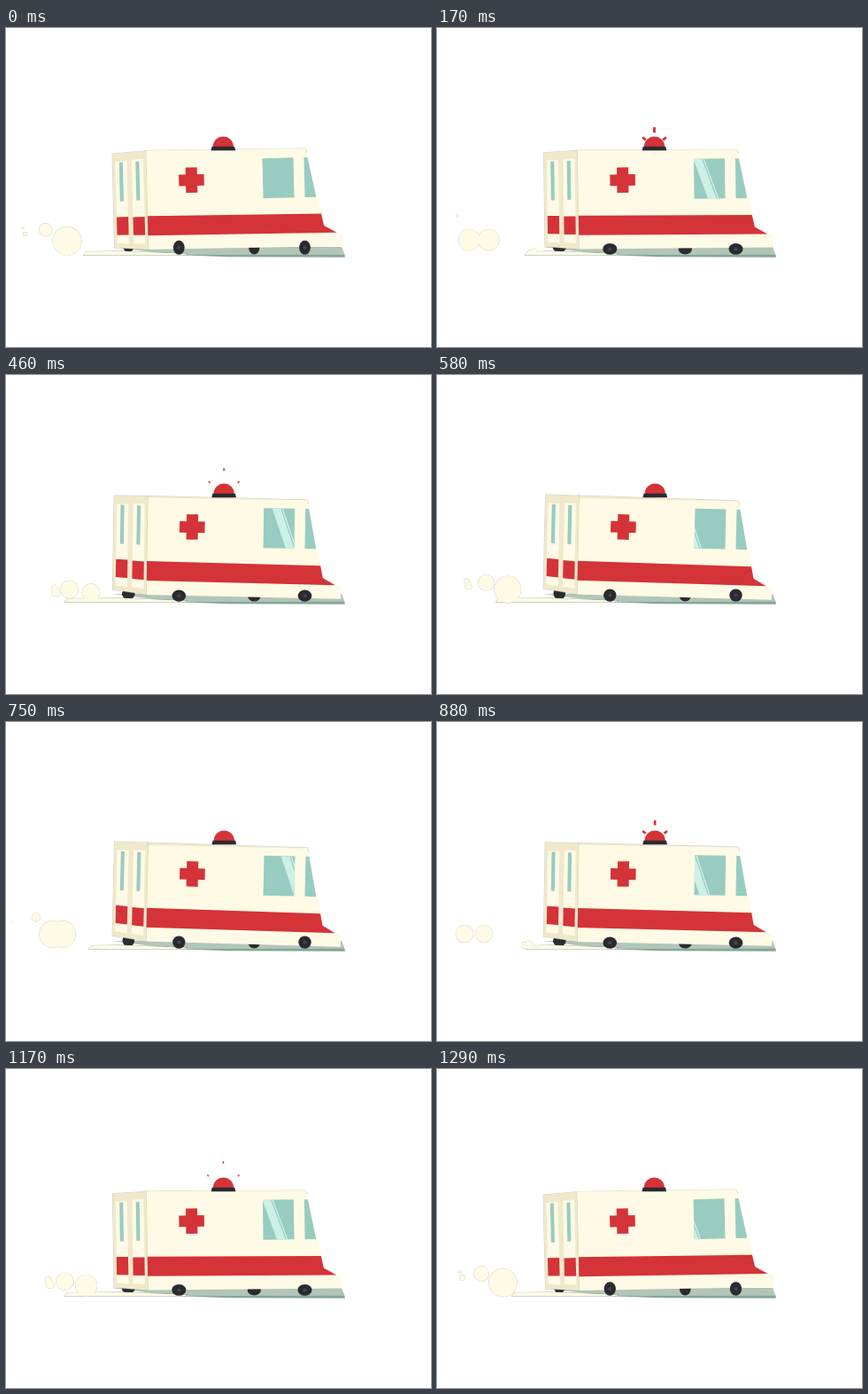
An HTML page with a canvas that plays this animation: 480x360 px, repeating every 1330 ms.

```html
<!DOCTYPE html>
<html lang="en">
<head>
<meta charset="utf-8">
<title>Ambulance</title>
<style>
  html, body { margin: 0; width: 100%; height: 100%; overflow: hidden; background: #fff; }
  canvas { display: block; }
</style>
</head>
<body>
<canvas id="stage" width="480" height="360"></canvas>
<script>
const ctx = document.getElementById('stage').getContext('2d');
const LOOP = 1330, STEPS = 32, CYCLE = 16, TURN = Math.PI * 2;
const CREAM = '#fffae5', BEIGE = '#f0e8cb', RED = '#d43338', TEAL = '#98ccc1',
      GLINT = '#cdf0e6', DARK = '#2b2a30', SHADE = '#b1c5b8', DEEP = '#86a697',
      EDGE = 'rgba(150,165,140,.5)', LINE = 'rgba(120,150,128,.8)';

function poly(color, pts, stroke) {
  ctx.beginPath();
  for (let j = 0; j < pts.length; j += 2) ctx.lineTo(pts[j], pts[j + 1]);
  ctx.closePath();
  if (stroke) {
    ctx.strokeStyle = stroke;
    ctx.lineWidth = 1;
    ctx.stroke();
  }
  ctx.fillStyle = color;
  ctx.fill();
}

function oval(color, x, y, rx, ry = rx) {
  ctx.beginPath();
  ctx.ellipse(x, y, rx, ry, 0, 0, TURN);
  ctx.fillStyle = color;
  ctx.fill();
}

function rect(color, x, y, w, h) {
  ctx.fillStyle = color;
  ctx.fillRect(x, y, w, h);
}

// Apply a transform about a point while drawing.
function about(x, y, b, c, paint) {
  ctx.save();
  ctx.translate(x, y);
  ctx.transform(1, b, c, 1, 0, 0);
  ctx.translate(-x, -y);
  paint();
  ctx.restore();
}

function wheel(x, floor, size, squash, hub) {
  const rx = (7.2 - .8 * squash) * size, ry = (7.2 + .8 * squash) * size;
  oval(DARK, x, floor - ry, rx, ry);
  if (hub) oval('#45444a', x, floor - ry, 2);
}

const swell = (age, life) => Math.sin(Math.PI * Math.min(1, age / life));
const drift = age => 123 - 5.4 * age;

// A big puff that swells, then splits in two.
function bigPuff(age) {
  const y = 253 - 14 * Math.sin(Math.PI / 2 * Math.min(1, age / 14));
  const r = 18 * swell(age, 20) ** 1.2 - 2;
  const split = 11 * Math.min(1, Math.max(0, (age - 10) / 4));
  return [-split, split].map(dx => [drift(age) + dx, y, r]);
}

// A light puff that rises, with two crumbs flying ahead.
function lightPuff(age) {
  const x = drift(age), y = 253 - .12 * age * age, far = 1.6 * age;
  return [
    [x, y, 11 * swell(age, 20) - 1],
    [x - far, y + far * .2, 5 * swell(age, 17)],
    [x - far * 1.1, y - far * .1, 4 * swell(age, 16)]
  ];
}

function smoke(s) {
  const puffs = [s, s + CYCLE]
    .flatMap(at => [[bigPuff, at - 6], [lightPuff, at - 1.5]])
    .filter(([, age]) => age > 0 && age < 20)
    .flatMap(([puff, age]) => puff(age))
    .filter(([, , r]) => r > .2);
  const joined = s >= 5 && s < 15;
  const left = joined ? Math.max(66, 100 - 8 * (s - 5)) : 84 + 3 * ((s + 1) % CYCLE);
  const strip = [left, 256, left + 4, 252.5, 130, 252, 205, 255, 200, 256.3];
  poly(CREAM, strip, LINE);
  for (const [x, y, r] of puffs) oval('#cbd2bf', x, y, r + .4);
  for (const [x, y, r] of puffs) oval(CREAM, x, y, r);
  poly(CREAM, strip);
}

function siren(i, pitch) {
  const cx = 245.8 - .5 * pitch, cy = 134, life = 11;
  const age = (i + CYCLE - 3) % CYCLE, fade = 1 - age / life;
  if (fade > 0) {
    ctx.strokeStyle = RED;
    for (const side of [-1, 0, 1]) {
      const a = side * .9 - Math.PI / 4 * 2, k = side ? .77 : 1;
      const d = (17.8 + 1.2 * age) * k, half = (1 + 2.2 * fade) * k;
      ctx.lineWidth = 1 + 2 * fade;
      ctx.beginPath();
      for (const at of [d - half, d + half]) ctx.lineTo(cx + at * Math.cos(a), cy + at * Math.sin(a));
      ctx.stroke();
    }
  }
  ctx.beginPath();
  ctx.arc(cx, cy, 11.6, Math.PI, 0);
  ctx.fillStyle = RED;
  ctx.fill();
  poly(DARK, [cx - 12.8, 133.8, cx + 12.8, 133.8, cx + 13.8, 138.3, cx - 13.8, 138.3]);
}

function rear() {
  poly(BEIGE, [121.3, 138.5, 159, 137.5, 159.3, 248.8, 121.3, 244.5], EDGE);
  for (const [x, drop] of [[124.5, 0], [143, 1.2]]) {
    poly(CREAM, [x, 147.8 - drop, x + 13, 147.2 - drop, x + 13.2, 241 + drop, x, 239.5 + drop]);
    poly(RED, [x, 210 + drop, x + 13.2, 210.4 + drop, x + 13.2, 231 + drop, x, 230.3 + drop]);
    rect(TEAL, x + 4.3, 148.7, 4.1, 44);
  }
}

function glass(i) {
  ctx.save();
  ctx.beginPath();
  ctx.rect(290.5, 149, 35, 45);
  ctx.clip();
  rect(TEAL, 290, 148, 36, 47);
  const x = Math.max(270, 329 - 9.7 * (i % 8));
  for (const [a, b] of [[0, 9.5], [10.8, 12.2]])
    poly(GLINT, [x + a, 149, x + b, 149, x + b + 16, 194, x + a + 16, 194]);
  ctx.restore();
  poly(TEAL, [337.5, 149, 341.5, 149, 350.3, 194, 337.5, 194]);
}

function van(i, pitch) {
  const roof = 3 * Math.max(0, -pitch), tilt = .024 * pitch;
  about(213, 192, -tilt, tilt, () => {
    poly(BEIGE, [158, 137.3, 339, 139, 341, 143, 158, 143], EDGE);
    poly(CREAM, [158, 137.3 + roof, 339, 139 + roof * .2, 341.5, 147, 350.5, 194, 353, 197,
      358, 226.5, 371, 233.5, 378.7, 237, 379.3, 250, 159, 248.8]);
    poly(RED, [159, 211, 355.5, 213, 358.3, 226.5, 372.5, 234.7, 159, 233]);
    rect(RED, 203.5, 157.3, 13, 28.5);
    rect(RED, 195.7, 165.2, 28.5, 12.8);
    glass(i);
    about(159, 0, -.037 * pitch, 0, rear);
  });
  siren(i, pitch);
}

function draw(i) {
  const angle = i / STEPS * TURN;
  const pitch = Math.cos(angle) - .2 * Math.sin(angle) ** 2;
  const squash = Math.cos(4 * angle);
  rect('#fff', 0, 0, 480, 360);
  poly(SHADE, [120, 247, 379, 247, 383, 257, 190, 256.3]);
  poly(DEEP, [190, 256, 382, 255.8, 383, 258.8, 250, 258.2]);
  for (const [x, floor] of [[138.3, 253.4], [280.3, 255.6]]) wheel(x, floor, .95, squash);
  smoke(i % CYCLE);
  van(i, pitch);
  for (const x of [195.3, 337.5]) wheel(x, 255.8, 1, squash, true);
}

function tick() {
  const t = performance.now() % LOOP;
  // 24 steps a second on a 10 ms clock
  draw(Math.min(STEPS - 1, Math.floor((Math.floor(t / 10) + .5) * .24)));
  requestAnimationFrame(tick);
}
tick();
</script>
</body>
</html>
```
